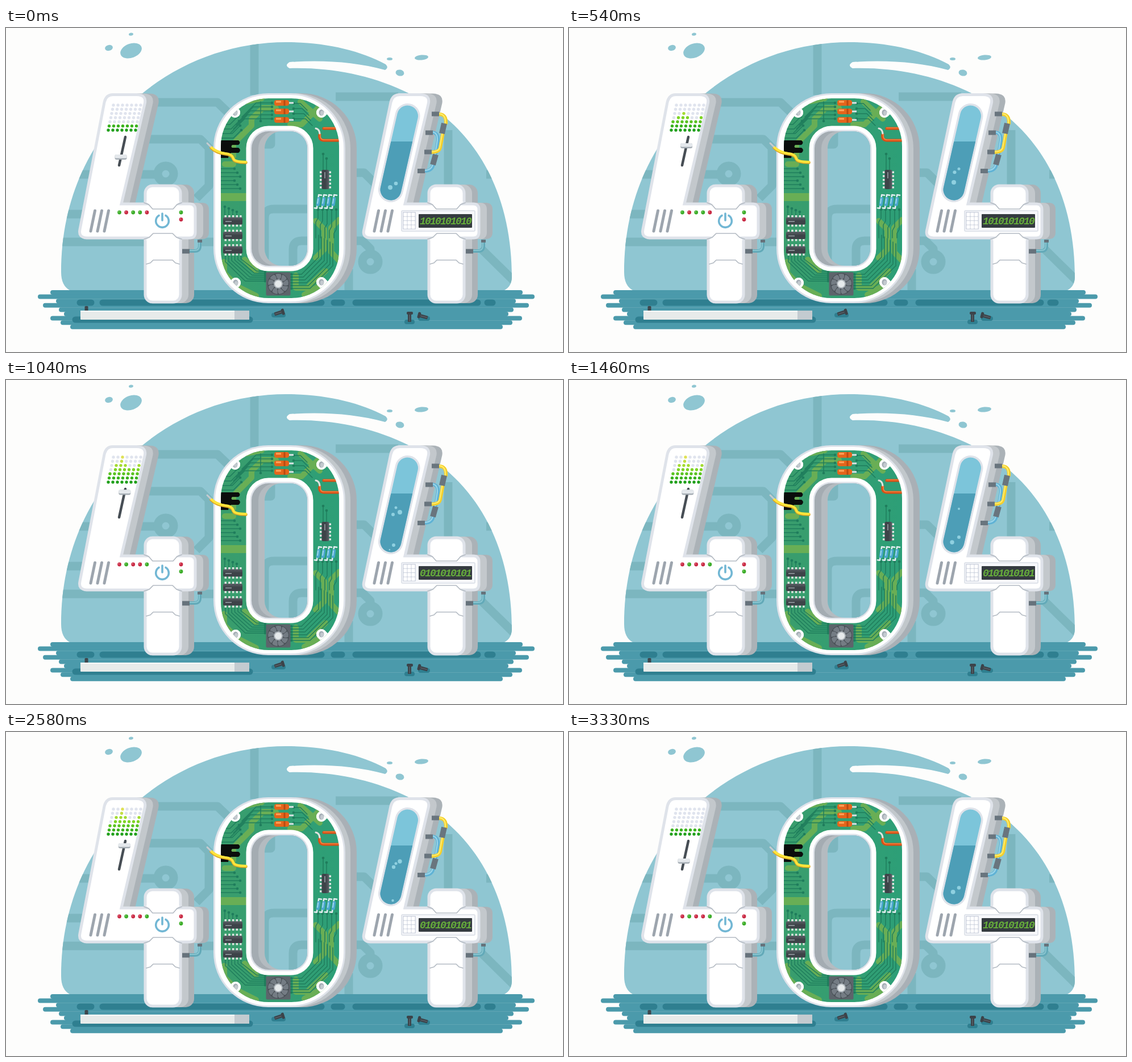
Recreate the animation shown at these times as an HTML page. Size 980x571 px, loop 3.37 s.

```html
<!DOCTYPE html>
<html lang="en">
<head>
<meta charset="utf-8">
<title>404</title>
<style>
  html, body { margin: 0; width: 100%; height: 100%; overflow: hidden; background: #fdfdfc; }
  svg { display: block; width: 100%; height: 100%; }
  .line { fill: none; stroke-linecap: round; stroke-linejoin: round; }
  .face { fill: #fff; stroke: #dfe3ea; stroke-width: 5; }
  #digits { font: italic bold 18px "Liberation Mono", monospace; letter-spacing: -1.8px; fill: #66ae3b; }
</style>
</head>
<body>
<svg viewBox="0 0 980 571">
  <defs>
    <path id="dome" d="M112 462Q97 454 97 430C97 180 290 25 493 25C560 25 622 39 668 64Q674 70 667 74C615 60 560 56 499 60Q489 66 499 71C568 69 638 82 698 110C834 173 890 300 890 440Q889 456 877 462Z"/>
    <clipPath id="domeClip"><use href="#dome"/></clipPath>
    <clipPath id="holeClip"><rect x="432" y="182" width="98" height="237" rx="30"/></clipPath>
    <clipPath id="backClip"><rect x="455" y="182" width="98" height="237" rx="30"/></clipPath>
    <clipPath id="boardClip"><rect x="378" y="124" width="208" height="352" rx="84"/></clipPath>
    <clipPath id="liquidClip"><rect x="640" y="200" width="100" height="120"/></clipPath>
    <linearGradient id="boardFill"><stop stop-color="#3a9d6c"/><stop offset="1" stop-color="#2c9f78"/></linearGradient>
    <linearGradient id="chipFill" x2="0" y2="1"><stop stop-color="#5a6066"/><stop offset=".5" stop-color="#3d4348"/></linearGradient>

    <g id="bg">
      <use href="#dome" fill="#8fc6d2"/>
      <g class="line" clip-path="url(#domeClip)" stroke="#7cb6bf" stroke-width="15" style="stroke-linecap:butt">
        <path d="M437 20V118M255 131H372L405 163M580 121H690M236 196H342L357 211V278L335 300M120 258H165M230 258H266M95 328H150M90 377H250M340 377H370"/>
        <path d="M440 205H466V180M455 420V335Q455 319 471 319H535M505 425V390Q505 375 520 375H545M600 255H630L650 275V300M600 375H627L641 389V397M745 377H770M835 388L900 452M778 180V278M845 258H880M603 425V470"/>
        <circle cx="281" cy="257" r="14"/><circle cx="641" cy="412" r="14"/>
      </g>
    </g>

    <path id="stemLeft" d="M188 117.500H230Q248 118 244 134L203 310H323Q333 310 333 320V360Q333 370 323 370H142Q127 369 130 355L173 131Q176 117.500 188 117.500Z"/>
    <path id="stemRight" d="M194 117.500H230Q248 118 244 134L203 310H323Q333 310 333 320V360Q333 370 323 370H142Q127 369 131 355L178 131Q181 117.500 194 117.500Z"/>
    <rect id="post" x="245" y="278" width="62" height="205" rx="13"/>

    <g id="trim">
      <path d="M246 306L253 312L260 319H293L299 312L306 306ZM246 374L253 368L260 362H293L299 368L306 374Z" fill="#fff"/>
      <path class="line" stroke="#b4bbc3" stroke-width="1.700" d="M243 308L251 311L258 319H294L301 311L309 308M243 372L252 369L259 362H293L300 369L309 372M247 416L254 414L259 409H293L298 414L305 416"/>
      <path class="line" stroke="#9da5ae" stroke-width="5" d="M156.500 322L149 358M168.500 322L161 358M180.500 322L173 358"/>
      <path class="line" stroke="#62a9b8" stroke-width="6" d="M320 393H332Q341 393 341 384V376"/>
      <path class="line" stroke="#8ac5d0" stroke-width="2" d="M322 392H332Q340 392 340 384V377"/>
      <path stroke="#66727b" stroke-width="8" d="M310 393.500H323M341 373V378"/>
    </g>

    <g id="chip">
      <path stroke="#dfe5e2" stroke-width="4" stroke-dasharray="3.500 3.200" d="M-14 -8H16M-14 8H16" transform="translate(-.5)"/>
      <rect x="-17" y="-6.500" width="34" height="13" rx="2" fill="url(#chipFill)"/>
      <path stroke="#858c92" stroke-width="2" d="M-13 1H-2"/>
    </g>
    <g id="fuse">
      <path stroke="#dde3e6" stroke-width="3" d="M10 0H19"/>
      <rect x="-15" y="-5" width="26" height="10" rx="4" fill="#e4651b"/>
      <path stroke="#ffa45b" stroke-width="3" d="M-12 -2H-3"/>
      <path stroke="#b94c12" stroke-width="3" d="M3 -5V5"/>
    </g>
    <g id="resistor" class="line">
      <path stroke="#e3edf0" stroke-width="2.500" d="M4 -12H-1V12H-5"/>
      <path stroke="#4aa7cf" stroke-width="6" d="M0 -5V5"/>
      <path stroke="#a0d8ea" stroke-width="2" d="M-1 -5V3"/>
    </g>
    <g id="bolt" fill="#3c4349">
      <rect x="-5" y="-10" width="11" height="5" rx="2"/><rect x="-3" y="-6" width="6" height="14" rx="1"/>
      <path d="M0 -5V7" stroke="#596169" stroke-width="1.500"/>
    </g>
    <g id="socket"><circle r="9" fill="#fff"/><ellipse rx="4.500" ry="5.500" fill="#a4adb5"/><ellipse cx="1" cy="1" rx="3" ry="4" fill="#c3cacf"/></g>
  </defs>

  <use href="#bg"/>
  <g fill="#8fc6d2">
    <ellipse rx="19.500" ry="12.500" transform="translate(220 40) rotate(-20)"/>
    <ellipse rx="7" ry="5" transform="translate(181 35) rotate(-15)"/>
    <ellipse rx="4" ry="2.500" transform="translate(220 11) rotate(-10)"/>
    <ellipse cx="675" cy="54.500" rx="5" ry="2.500"/>
    <ellipse rx="12" ry="4.500" transform="translate(731 52) rotate(-5)"/>
    <ellipse rx="7.500" ry="5.500" transform="translate(693 79) rotate(12)"/>
  </g>

  <g id="floor" class="line" stroke="#4b9aab" stroke-width="8"></g>
  <path class="line" stroke="#2f7f90" stroke-width="11" d="M130 484H150M170 484H555M577 484H591M615 484H830M847 484H856M122 514H429"/>
  <path class="line" stroke="#2f7f90" stroke-width="8" d="M471 506H488M705 518H715M729 512H742"/>
  <rect x="138.500" y="490" width="6" height="9" rx="1.500" fill="#3f484e"/>
  <rect x="131" y="498" width="297" height="16" rx="1" fill="#e7ebea"/>
  <path d="M402 498H428V514H402Z" fill="#c3cbd0"/>
  <path d="M131 499H402" stroke="#f7f9f8" stroke-width="2"/>
  <use href="#bolt" transform="translate(480 502) rotate(72)"/>
  <use href="#bolt" transform="translate(710 510)"/>
  <use href="#bolt" transform="translate(734 508.500) rotate(-75)"/>

  <g id="fourLeft"></g>
  <g id="matrix"></g>
  <path class="line" stroke="#474e55" stroke-width="4.500" d="M210 192L199 242"/>
  <g id="knob">
    <rect x="-10.500" y="-4.500" width="21" height="9" rx="3" fill="#a5adb4"/>
    <rect x="-10.500" y="-4.500" width="21" height="6.500" rx="2.500" fill="#e4e8ec"/>
  </g>
  <g id="leds"></g>
  <path class="line" stroke="#72b7d4" stroke-width="3.600" d="M269 330.500A11.300 11.300 0 1 0 281 330.500M275 327V339"/>

  <rect x="390" y="115" width="227" height="370" rx="97" fill="#a9b0b6"/>
  <rect x="376" y="115" width="230" height="370" rx="97" fill="#c1c7cb"/>
  <rect x="366.500" y="116.500" width="229" height="367" rx="95" class="face" style="stroke-width:3"/>
  <g clip-path="url(#boardClip)">
    <path d="M370 120H600V480H370Z" fill="url(#boardFill)"/>
    <g class="line" stroke="#69ae55" stroke-width="10">
      <path d="M400 226V204L432 172V160L452 141H475M420 130L450 124M500 170H520L552 138M518 130L552 160M385 240H400"/>
      <path d="M375 298H426" stroke-width="14"/>
      <path d="M545 340L560 355V390L545 405M586 338L572 352V395L586 410M510 436V458H530L562 428M420 408L440 428M384 412V432L408 456L440 472M525 470L560 450"/>
    </g>
    <g id="traces" class="line" stroke="#1f7d5c" stroke-width="1.500"></g>
    <path fill="#0b0d0c" d="M376 198H409Q414 202 409 206H398Q395 209 398 211H409Q415 215 409 220H396Q392 222 391 229H376Z"/>
    <path class="line" stroke="#fff" stroke-width="18" d="M403 149L385 130M555 149L575 130M404 449L386 468M555 448L574 467"/>
    <use href="#socket" x="403" y="149"/><use href="#socket" x="555" y="149"/>
    <use href="#socket" x="404" y="449"/><use href="#socket" x="555" y="448"/>
    <path class="line" stroke="#d94f15" stroke-width="5" d="M559 177H590M552 188Q550 198 560 198H590"/>
    <path class="line" stroke="#f58540" stroke-width="1.700" d="M559 176H590M553 188Q552 197 560 197H590"/>
    <path class="line" stroke="#e1e4df" stroke-width="3" d="M545 177Q551 178 552 186"/>
  </g>
  <g id="parts"></g>
  <rect x="428" y="178" width="107" height="245" rx="34" fill="none" stroke="#fff" stroke-width="11"/>
  <rect x="431" y="181" width="100" height="239" rx="31" fill="none" stroke="#dfe3ea" stroke-width="3"/>
  <g clip-path="url(#holeClip)">
    <path d="M430 180H532V420H430Z" fill="#a4acb2"/>
    <rect x="444" y="182" width="98" height="237" rx="30" fill="#b4bbc0"/>
    <g clip-path="url(#backClip)"><use href="#bg"/></g>
  </g>
  <path class="line" stroke="#dca523" stroke-width="5.500" d="M361 211Q370 220 386 222Q398 223 400 231Q402 237 422 237"/>
  <path class="line" stroke="#ffe53b" stroke-width="4" d="M361 210Q370 219 386 221Q398 222 400 230Q402 236 422 236"/>
  <path class="line" stroke="#c5cbd0" stroke-width="3" d="M354 203L360 209"/>
  <g id="fan" transform="translate(479 451)">
    <rect x="-21.500" y="-20.500" width="43" height="41" rx="2" fill="#5d646b"/>
    <circle r="19" fill="#484f55"/>
  </g>
  <g id="sparks" fill="#fff"></g>

  <g id="fourRight" transform="translate(499)"></g>
  <g class="line">
    <path stroke="#dfe3ea" stroke-width="44" d="M706.500 155L677 285"/>
    <path stroke="#7cc5da" stroke-width="37" d="M706.500 155L677 285"/>
    <path stroke="#4d9eb7" stroke-width="37" d="M706.500 155L677 285" clip-path="url(#liquidClip)"/>
  </g>
  <g id="bubbles" fill="#8fd0e0"></g>
  <g class="line" stroke-width="6">
    <path stroke="#5fb2d5" d="M749 184Q761 184 760 198L756 222M752 240Q750 252 736 252"/>
    <path stroke="#9bd5e9" stroke-width="2" d="M749 183Q760 184 759 198L755 222M751 240Q749 251 736 251"/>
    <path stroke="#f4cf2c" d="M762 152Q775 152 774 168M769 184L764 211Q762 219 748 219"/>
    <path stroke="#ffed70" stroke-width="2" d="M762 151Q774 152 773 168M768 184L763 211Q761 218 748 218"/>
  </g>
  <path stroke="#69757e" stroke-width="8" d="M749 151.500H762M738 184.500H751M736 218.500H749M724 252H737"/>
  <path stroke="#69757e" stroke-width="10" d="M771 168L767 186M756 223L751 241"/>
  <rect x="696" y="322" width="129" height="36" rx="2" fill="#f7f8fb" stroke="#dfe3ea" stroke-width="2"/>
  <rect x="698" y="324" width="23" height="31" rx="1" fill="#d0d5e0"/>
  <g id="keys" fill="#fff"></g>
  <rect x="726" y="328" width="94" height="24" rx="1" fill="#353b40"/>
  <text id="digits" x="728" y="346"></text>
</svg>
<script>
const LOOP = 3370, BUBBLE_LOOP = LOOP / 2;
const $ = id => document.getElementById(id);
const times = (n, fn) => Array.from({ length: n }, (_, i) => fn(i)).join('');
const dot = (x, y, r, fill) => `<circle cx="${x}" cy="${y}" r="${r}"${fill ? ` fill="${fill}"` : ''}/>`;
const place = (id, x, y, turn = 0) => `<use href="#${id}" transform="translate(${x} ${y}) rotate(${turn})"/>`;

// A four: two layers of depth, then the faces and the shared details
function four(stem) {
  const layer = (x, color) => `<g transform="translate(${x})" fill="${color}" stroke="${color}" stroke-width="4">
    <use href="#post"/><use href="#${stem}"/></g>`;
  return layer(22, '#abb2b7') + layer(12, '#c3c8cc') +
    `<g class="face"><use href="#post"/><use href="#${stem}"/></g><use href="#trim"/>`;
}
$('fourLeft').innerHTML = four('stemLeft');
$('fourRight').innerHTML = four('stemRight');

// Ragged ends of the floor, one row at a time
const floorRows = [[82, 905], [60, 926], [92, 893], [69, 916], [97, 889], [106, 880], [82, 904], [100, 887], [117, 870]];
$('floor').innerHTML = floorRows.map(([a, b], i) => `<path d="M${a} ${466 + i * 7.6}H${b}"/>`).join('');

$('keys').innerHTML = times(12, i =>
  `<rect x="${699.5 + i % 3 * 7}" y="${325.5 + (i / 3 | 0) * 7.3}" width="6" height="6.3" rx="1"/>`);

// Bundles of circuit lines
const trace = (d, x, y) => `<path d="${d}"/>` + dot(x, y, 1.6, '#1f7d5c');
$('traces').innerHTML =
  times(6, i => trace(`M378 ${248 + i * 7}H${402 + i % 3 * 5}`, 402 + i % 3 * 5, 248 + i * 7)) +
  times(6, i => trace(`M${386 + i * 5.5} 402V${412 - i}L${421 + i * 4} ${446 - i * 3.5}H456`, 456, 446 - i * 3.5)) +
  times(6, i => trace(`M502 ${434 + i * 5}H${520 + i * 3}L${550 + i * 5} ${404 + i * 3}V${365 + i * 3}`, 502, 434 + i * 5)) +
  times(5, i => trace(`M${549 + i * 8} 320V${335 + i * 5}L${545 + i * 8} ${342 + i * 5}V370`, 549 + i * 8, 320)) +
  times(5, i => trace(`M468 ${132 + i * 7}H${440 - i * 5}L${415 - i * 5} ${157 + i * 7}`, 468, 132 + i * 7)) +
  times(4, i => trace(`M506 ${133 + i * 9}H${518 + i * 3}L${530 + i * 3} ${145 + i * 9}`, 506, 133 + i * 9)) +
  times(4, i => trace(`M${385 + i * 7} 332V${315 + i * 3}`, 385 + i * 7, 315 + i * 3)) +
  times(2, i => trace(`M${558 + i * 6} 250V${222 + i * 8}`, 558 + i * 6, 222 + i * 8)) +
  times(4, i => trace(`M380 ${170 + i * 8}H${394 + i * 2}L${408 + i * 2} ${156 + i * 8}`, 408 + i * 2, 156 + i * 8)) +
  trace('M448 130V164', 448, 164);

$('parts').innerHTML =
  times(3, i => place('fuse', 487, 132 + i * 15)) +
  times(3, i => place('chip', 399, 340 + i * 25.5)) +
  times(4, i => place('resistor', 549.5 + i * 9, 306, 8)) +
  place('chip', 562, 267, 90);

$('fan').innerHTML += times(9, i =>
  `<path d="M0 -6Q7 -10 5 -17Q0 -19 -5 -17Z" fill="#747c84" transform="rotate(${i * 40})"/>`) +
  dot(0, 0, 8, '#aeb5bb') + dot(0, 0, 6, '#e6eaec');

const clamp = v => Math.min(1, Math.max(0, v));
const ease = p => p < .5 ? 2 * p * p : 1 - 2 * (1 - p) ** 2;
const mix = (a, b, p) => a + (b - a) * p;

const peaks = [3, 5, 7, 5, 4, 4, 5];
const sparkAngles = [-97, -52, -147, 172, 145, 118];
// Stops of each bubble: time, x, y, radius
const bubbles = [
  [[850, 680, 299, 2], [1040, 682, 291, 3], [1460, 686, 277, 3], [1685, 686, 274, 3.3], [2080, 686, 255, 2.5], [2725, 686, 225, 2.5], [3145, 686, 227, 2], [3220, 686, 226, 0]],
  [[980, 675, 301, 1], [1460, 674, 286, 3.7], [1685, 676, 281, 4], [2080, 677, 261, 3], [2580, 682, 238, 3.2], [2725, 681, 237, 3], [2950, 682, 226, 0]],
  [[120, 677, 286, 0], [395, 677, 273, 4], [540, 677, 272, 4], [895, 693, 228, 3.7], [1040, 693, 233, 4], [1300, 693, 214, 0]]
];

function bubbleAt(stops, t) {
  const i = stops.findIndex(s => s[0] > t);
  if (i < 1) return '';
  const a = stops[i - 1], b = stops[i], p = (t - a[0]) / (b[0] - a[0]);
  return dot(...[1, 2, 3].map(k => mix(a[k], b[k], p)));
}

function draw(t) {
  const level = ease(clamp(t / 900)) - ease(clamp((t - 2400) / 900));
  const knobY = 227.5 - 29.5 * level;
  $('knob').setAttribute('transform', `translate(${202 + (227.5 - knobY) * .23} ${knobY})`);
  $('matrix').innerHTML = times(49, i => {
    const col = i % 7, row = i / 7 | 0;
    const on = row < Math.round(mix(2, peaks[col], level));
    const fill = on ? `hsl(${118 - row * 9.5} 70% ${37 + row * 4}%)` : '#e0e4ee';
    return dot(180 + col * 8 + row * 1.5, 180 - row * 7.35, 2.7, fill);
  });

  const flipped = Math.floor(t / (LOOP / 4)) % 2;
  const led = (x, y, green) => dot(x, y, 3.4, green ? '#3dad2b' : '#c92b45') + dot(x - 1, y - 1, 1, green ? '#91da75' : '#ee8595');
  $('leds').innerHTML = [1, 0, 1, 1, 0].map((g, i) => led(199.5 + i * 12.1, 325, g ^ flipped)).join('') +
    led(308, 325, !flipped) + led(308, 337.5, flipped);
  $('digits').textContent = (Math.floor(t / 820) % 2 ? '01' : '10').repeat(5);

  $('bubbles').innerHTML = bubbles.map(b => times(2, i => bubbleAt(b, t % BUBBLE_LOOP + i * BUBBLE_LOOP))).join('');

  const burst = (t - 1900) / 360;
  $('sparks').innerHTML = burst > 0 && burst < 1 ? sparkAngles.map(deg => {
    const a = deg * Math.PI / 180, d = 32 * burst;
    return dot(547 + d * Math.cos(a), 178 + d * Math.sin(a), 3.4 * Math.min(burst, 1 - burst) + .2);
  }).join('') : '';
}

function tick() {
  draw(performance.now() % LOOP);
  requestAnimationFrame(tick);
}
tick();
</script>
</body>
</html>
```
